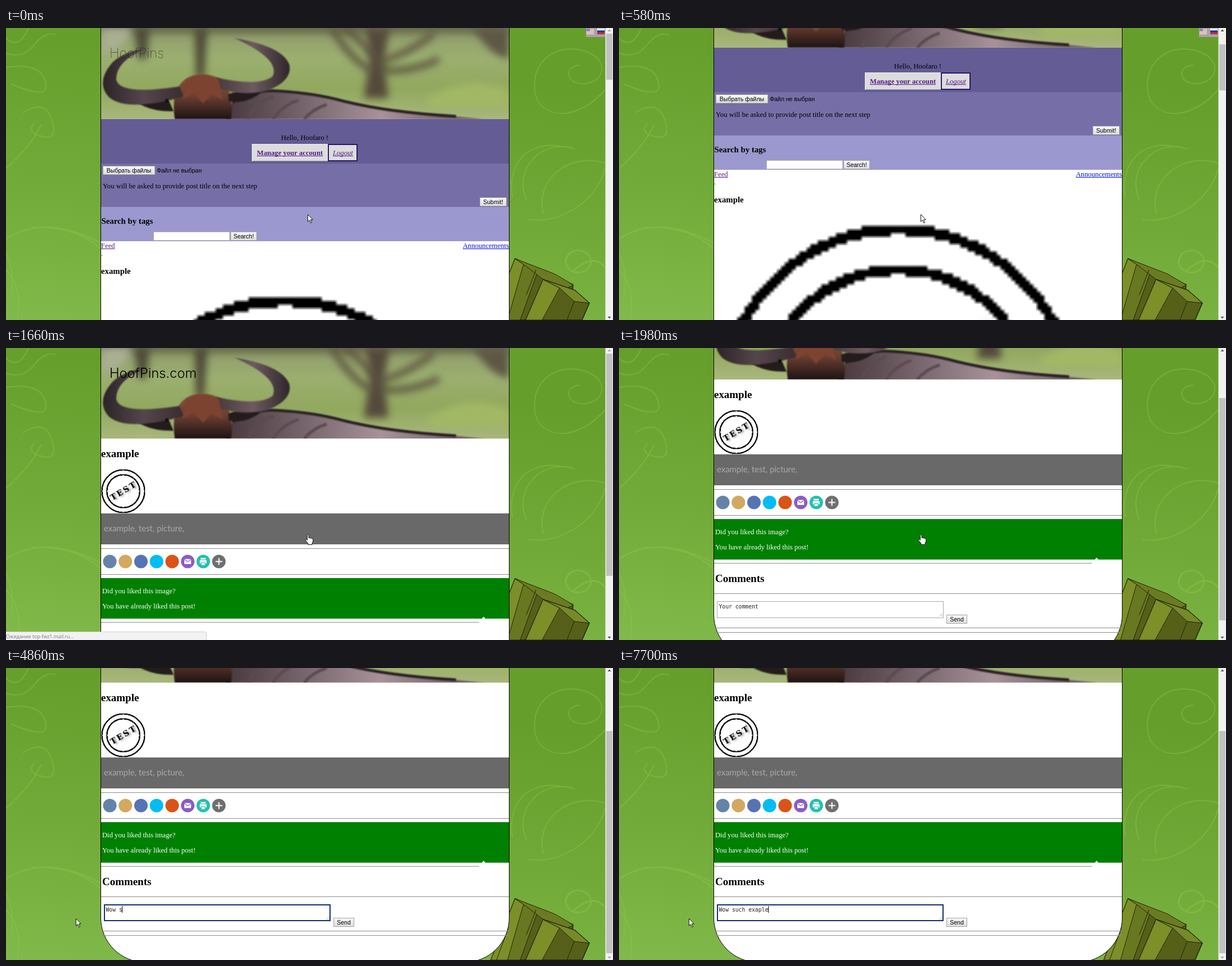
Write an HTML page with a canvas that moves like this. It is 1079x519 px and loops after 8 s.

```html
<!DOCTYPE html>
<html lang="en">
<head>
<meta charset="utf-8">
<title>Posting a comment</title>
<style>
html, body { margin: 0; width: 100%; height: 100%; overflow: hidden; }
canvas { display: block; }
</style>
</head>
<body>
<canvas id="stage" width="1079" height="519"></canvas>
<script>
const W = 1079, H = 519, LOOP = 8000;
const SERIF = '"Liberation Serif", "Times New Roman", serif';
const SANS = '"Liberation Sans", Arial, sans-serif';
const BODY = '12.64px ' + SERIF, H3 = 'bold 14.79px ' + SERIF, H2 = 'bold 18.96px ' + SERIF;
const UI = '10.53px ' + SANS, STATUS = '8.75px "Open Sans", sans-serif';
const CODE = '9.72px "DejaVu Sans Mono", monospace', CHAR = 5.85;
const VISITED = '#551a8b';

const stage = document.getElementById('stage').getContext('2d');
let g = stage;

// Drawing helpers, all painting into the current context g
function layer(w, h, draw) {
  const canvas = document.createElement('canvas');
  canvas.width = w;
  canvas.height = h;
  g = canvas.getContext('2d');
  draw();
  g = stage;
  return canvas;
}
function rect(x, y, w, h, fill) {
  g.fillStyle = fill;
  g.fillRect(x, y, w, h);
}
function frame(x, y, w, h, color, line = 1) {
  g.strokeStyle = color;
  g.lineWidth = line;
  g.strokeRect(x + line / 2, y + line / 2, w - line, h - line);
}
function shape(d, fill, stroke, line = 1) {
  const path = new Path2D(d);
  if (fill) { g.fillStyle = fill; g.fill(path); }
  if (stroke) { g.strokeStyle = stroke; g.lineWidth = line; g.stroke(path); }
}
function disc(x, y, r, fill) {
  g.beginPath();
  g.arc(x, y, r, 0, 7);
  g.fillStyle = fill;
  g.fill();
}
function gradient(x0, y0, x1, y1, ...colors) {
  const fill = g.createLinearGradient(x0, y0, x1, y1);
  colors.forEach((c, i) => fill.addColorStop(i / (colors.length - 1), c));
  return fill;
}
function text(s, x, y, font, color = '#000', align = 'left') {
  g.font = font;
  g.fillStyle = color;
  g.textAlign = align;
  g.fillText(s, x, y);
}
function link(s, x, y, font, color, align = 'left') {
  text(s, x, y, font, color, align);
  const w = g.measureText(s).width;
  rect(align === 'right' ? x - w : x, y + 1, w, 1, color);
}
function button(x, y, w, h, label) {
  rect(x, y, w, h, gradient(0, y, 0, y + h, '#f8f8f8', '#dcdcdc'));
  frame(x, y, w, h, '#a4a4a4');
  text(label, x + w / 2, y + 12, UI, '#000', 'center');
}
const rule = (y, right = 894) => rect(169, y, right - 169, 1, '#8c8c8c');

const backdrop = layer(W, H, () => {
  rect(0, 0, W, H, gradient(60, 0, 0, H, '#669e2c', '#72aa39', '#81b94a'));
  g.lineCap = 'round';
  const vine = 'rgba(150,200,70,.38)';
  shape('M0 45Q30 55 50 30T88 12M0 18Q22 40 40 0M0 70Q60 60 70 95T10 100' +
    'M30 150Q70 125 82 165T55 190Q38 182 50 170M0 250Q45 210 62 172', null, vine, 2);
  shape('M0 375Q70 330 168 382M45 355Q120 350 168 392M0 430Q30 460 20 519M0 400Q18 440 8 480', null, vine, 2);
  shape('M945 130C925 80 960 30 1015 38S1070 90 1035 98S985 70 1020 66M945 130C975 170 1030 150 1065 110',
    null, vine, 2);
  shape('M900 300C890 240 930 200 985 210M925 305C900 250 955 195 1010 215M930 340C980 350 1050 310 1065 250' +
    'M955 330C940 270 1000 220 1065 240', null, vine, 2);
  shape('M995 415a22 19 0 1 0 45 0a22 19 0 1 0-45 0M1010 430Q1045 400 1065 425', null, vine, 3);
  const ink = '#1e2408', dark = '#566019', light = '#7c8f29';
  shape('M905 410L1008 456L1003 519H862Z', dark, ink, 1.5);
  shape('M905 410L942 427L908 519H862Z', light, ink);
  shape('M921 418L947 428L914 519H892Z', '#687820', ink);
  shape('M905 410L975 437L1009 457L998 462L955 447L925 424Z', '#6c7b23', ink);
  shape('M955 447L1011 466L1037 489L1024 519H924Z', dark, ink, 1.5);
  shape('M955 447L984 462L953 519H924Z', light, ink);
  shape('M955 447L1011 466L1037 489L1010 486L984 462Z', '#78892a', ink);
  shape('M1010 486L997 519M942 430L925 474M872 519L893 462', null, ink);
});

const photo = layer(W, 162, () => {
  g.beginPath();
  g.rect(169, 0, 725, 162);
  g.clip();
  rect(169, 0, 725, 162, gradient(0, 0, 0, 162, '#8e9a6b', '#9caf70', '#91a85e', '#a9b77c'));
  g.filter = 'blur(7px)';
  rect(169, -10, 725, 20, '#66684a');
  shape('M228 0H255L250 55H235ZM335 0H358L352 90H338Z', '#4d4a37');
  shape('M640 0H682L672 60L680 125H636L646 60Z', '#554a3b');
  shape('M650 75Q610 55 580 0M660 60Q710 50 760 10M655 50Q620 10 600 0M664 75Q720 80 770 55', null, '#5c533e', 11);
  shape('M830 0H894V55Q860 50 830 0Z', '#5d5745');
  shape('M169 0H225Q205 50 169 45Z', '#a9af91');
  shape('M750 125Q820 80 894 110V140H750Z', '#a2b865');
  g.filter = 'blur(1px)';
  shape('M390 162L402 132Q440 108 485 112Q550 116 600 130Q680 150 800 157L850 162Z',
    gradient(400, 0, 800, 0, '#4a3c40', '#77666d', '#a8929a', '#71616a'));
  shape('M402 132Q440 108 485 112Q550 116 600 130Q680 150 800 157', null, '#2a2126', 5);
  shape('M430 162Q445 130 475 122M475 162Q490 138 520 128M530 162Q545 144 570 136', null, '#5b4a51', 5);
  shape('M300 162Q292 110 320 90Q348 74 380 90Q408 115 400 162Z',
    gradient(0, 80, 0, 162, '#8b5238', '#6b3f30', '#1d1315'));
  shape('M210 111Q250 112 290 130L298 148Q240 150 210 111ZM395 118Q425 104 452 116Q425 136 396 130Z', '#241b1d');
  shape('M251 36Q195 58 196 92Q202 120 308 104L316 122Q215 150 183 123Q160 98 186 65Q205 42 251 36Z',
    gradient(172, 0, 316, 0, '#2b2428', '#54464b', '#3a2d31'));
  shape('M406 18Q492 32 504 66Q509 94 465 111Q420 122 380 108L374 88Q450 105 474 86Q488 55 406 18Z',
    gradient(374, 0, 504, 0, '#4a393c', '#6c5a5f', '#30272b'));
  shape('M320 92Q345 75 378 92L386 128L366 118L350 134L334 116L314 126Z', '#7b4330');
  disc(286, 129, 3, '#0d0a0b');
  g.filter = 'none';
});

// Coarse 100 x 100 stamp, shown both enlarged and reduced
const stamp = layer(100, 100, () => {
  for (let y = 0; y < 100; y++) for (let x = 0; x < 100; x++) {
    const r = Math.hypot(x - 49.5, y - 49.5);
    if (Math.abs(r - 48) < 1.45 || Math.abs(r - 37) < 1.45) rect(x, y, 1, 1, '#000');
  }
  rect(0, 49, 1, 1, '#000');
  rect(10, 49, 1, 1, '#000');
  g.translate(49, 49.5);
  g.rotate(-0.535);
  g.shadowColor = 'rgba(0,0,0,.5)';
  g.shadowBlur = 4;
  g.shadowOffsetX = 4;
  g.shadowOffsetY = 1;
  [...'TEST'].forEach((s, i) =>
    text(s, (i - 1.5) * 16.6, 6.5, 'bold 18px "DejaVu Serif", serif', '#000', 'center'));
});

const feedPage = layer(W, 850, () => {
  rect(168, 0, 727, 850, '#000');
  rect(169, 0, 725, 850, '#fff');
  g.drawImage(photo, 0, 0);
  text('HoofPins', 184, 53, '100 23.7px Inter, sans-serif', '#1c1c18');
  rect(169, 162, 725, 79, '#635c95');
  rect(169, 241, 725, 77, '#766fa7');
  rect(169, 318, 725, 61, '#9b98cf');
  text('Hello, Hoofaro !', 531, 199, BODY, '#000', 'center');
  rect(437, 206, 135, 31, '#dcdcdc');
  frame(437, 206, 135, 31, '#efefef');
  rect(438, 236, 134, 1, '#8f8f9a');
  link('Manage your account', 446, 226, 'bold ' + BODY, VISITED);
  rect(572, 206, 53, 31, '#dcdcdc');
  frame(572, 206, 53, 31, '#2c1668', 2);
  link('Logout', 581, 226, 'italic ' + BODY, VISITED);
  button(172, 245, 93, 16, 'Выбрать файлы');
  text('Файл не выбран', 268, 257, UI);
  text('You will be asked to provide post title on the next step', 172, 285, BODY);
  button(842, 301, 48, 16, 'Submit!');
  text('Search by tags', 169.5, 348, H3);
  rect(262, 362, 136, 16, '#fff');
  frame(262, 362, 136, 16, '#b5b5b5');
  button(399, 362, 47, 16, 'Search!');
  link('Feed', 169, 391, BODY, VISITED);
  link('Announcements', 894, 391, BODY, '#0010d8', 'right');
  text('.', 169, 405, BODY, VISITED);
  text('example', 169, 437, H3);
  g.drawImage(stamp, 171, 472, 650, 650);
});

const postPage = layer(W, 660, () => {
  g.beginPath();
  g.roundRect(168.5, -200, 726, 858, 79);
  g.fillStyle = '#fff';
  g.fill();
  g.strokeStyle = '#000';
  g.stroke();
  g.drawImage(photo, 0, -1);
  text('HoofPins.com', 184, 53, '300 23.7px Inter, sans-serif');
  text('example', 169, 194, H2);
  g.drawImage(stamp, 169, 215, 79, 79);
  rect(169, 294, 725, 55, '#696969');
  text('example, test, picture,', 174, 326, '14.9px Lato, sans-serif', '#a9a9a9');
  rule(356);
  ['#6384a8', '#d2a95f', '#5673b5', '#00bdf3', '#da5418', '#8a5cc8', '#22c1ae', '#6f6f6f']
    .forEach((color, i) => disc(184.5 + i * 27.7, 379.5, 12, color));
  rect(317, 375, 12, 9, '#fff');
  shape('M317 375.5L323 380L329 375.5', null, '#8a5cc8', 1.3);
  shape('M346 373h9v3h-9zM344.500 377h12v6h-2v-2h-8v2h-2zM347.500 382h6v4h-6z', '#fff');
  shape('M378.500 373.500v12M372.500 379.500h12', null, '#fff', 2);
  rule(402);
  rect(169, 409, 725, 72, '#008000');
  text('Did you liked this image?', 171, 436, BODY, '#fff');
  text('You have already liked this post!', 171, 463, BODY, '#fff');
  shape('M846 481L849 477.500L852 481Z', '#fff');
  rule(487, 841);
  text('Comments', 171, 521, H2);
  rule(541);
  button(582, 579, 37, 16, 'Send');
  rule(602);
  rule(610);
});

// Piecewise linear value through [time, value] points
function track(t, points) {
  let [t0, v0] = points[0];
  for (const [t1, v1] of points) {
    if (t < t1) return t <= t0 ? v0 : v0 + (v1 - v0) * (t - t0) / (t1 - t0);
    [t0, v0] = [t1, v1];
  }
  return v0;
}

const feedScroll = [[340, 0], [440, 32], [580, 126], [680, 255], [740, 312], [800, 316]];
const postScroll = [[1785, 0], [1880, 40], [1980, 105], [2060, 130], [2120, 135]];
const pointerX = [[2040, 536], [2420, 249], [2600, 249], [2780, 218], [3300, 124]];
const pointerY = [[2040, 331], [2420, 436], [2600, 436], [2780, 443], [3300, 445]];
const typed = 'Wow such exaple';
const keyTimes = [3840, 4100, 4320, 4600, 4860, 5180, 5380, 5620, 5860, 6060, 6300, 6580, 7260, 7460, 7700];
const POST_AT = 1480, FOCUS_AT = 2610;

function commentBox(t, top) {
  const focused = t >= FOCUS_AT, left = 177.5, base = top + 13;
  rect(174, top, 403, 30, '#fff');
  frame(174, top, 403, 30, focused ? '#12316b' : '#a9a9a9', focused ? 2 : 1);
  shape(`M570 ${top + 27}l5-5M573 ${top + 27}l2-2`, null, '#999', .8);
  const count = keyTimes.filter(k => t >= k).length;
  if (count) {
    text(typed.slice(0, count), left, base, CODE, '#222');
    if (t < 7120 || t >= 7260) rect(Math.round(left + count * CHAR - .5), top + 3, 1, 12, '#000');
    return;
  }
  const draft = 'Your comment';
  text(draft, left, base, CODE, '#222');
  if (!focused) return;
  const from = Math.min(12, Math.max(0, Math.round((track(t, pointerX) + 5 - left) / CHAR)));
  if (from === 12) return;
  const x = left + from * CHAR;
  rect(x, top + 3, (12 - from) * CHAR, 12, '#338fe2');
  text(draft.slice(from), x, base, CODE, '#fff');
}

function flags() {
  rect(1031, 0, 34, 16, '#aaa3ab');
  for (let i = 0; i < 5; i++) rect(1032, 1 + i * 2, 13, 1, '#d98a86'), rect(1032, 2 + i * 2, 13, 1, '#eee');
  rect(1032, 1, 6, 5, '#8588b5');
  ['#fff', '#1c35a8', '#d3242c'].forEach((c, i) => rect(1051, 1 + i * 3.4, 13, 3.4, c));
}

function scrollbar(top, length, atStart, atEnd) {
  rect(1065.5, 0, 14, H, '#f1f1f1');
  rect(1067, Math.round(top), 11, length, '#c1c1c1');
  shape('M1069.500 6L1072.500 2.500L1075.500 6Z', atStart ? '#a3a3a3' : '#505050');
  shape('M1069.500 513L1072.500 516.500L1075.500 513Z', atEnd ? '#a3a3a3' : '#505050');
}

function statusBubble(label, width, alpha) {
  g.globalAlpha = alpha;
  g.beginPath();
  g.roundRect(-4, 504.5, width + 4, 20, 3);
  g.fillStyle = '#f2f2f2';
  g.fill();
  g.strokeStyle = '#cfcfcf';
  g.lineWidth = 1;
  g.stroke();
  text(label, 0, 516, STATUS, '#777');
  g.globalAlpha = 1;
}

function pointer(t) {
  const x = track(t, pointerX), y = track(t, pointerY);
  g.save();
  g.translate(Math.round(x) + .5, Math.round(y) + .5);
  if (t >= 1220 && t < 2040)
    shape('M-1 1.200Q.3-.8 1.600 1.200V6Q3 5 4.200 6.400Q5.800 5.600 6.800 7Q9 6.400 9.300 8.500V12L7.600 15.500V18H.5V16L-4.600 9.600Q-4.400 7.600-2.400 8.600L-1 10Z', '#fff', '#000', .9);
  else if (y > 420 && x > 170)
    shape('M-2.500-6.500H-.7L0-6L.7-6.500H2.500M0-6V6M-2.500 6.500H-.7L0 6L.7 6.500H2.500', null, '#000', 1);
  else
    shape('M0 0V12.600L2.900 9.900L5.200 15L7.100 14.200L4.900 9.200H8.900Z', '#fff', '#000', .9);
  g.restore();
}

function draw(t) {
  g.drawImage(backdrop, 0, 0);
  if (t < POST_AT) {
    const y = Math.round(track(t, feedScroll));
    g.drawImage(feedPage, 0, -y);
    flags();
    scrollbar(10 + y * .151, 82, y === 0, false);
    if (t >= 940 && t < 1420) statusBubble('hoofpins.com/post/example', 374, Math.min(1, (t - 910) / 90));
  } else {
    const y = Math.round(track(t, postScroll));
    g.drawImage(postPage, 0, -y);
    commentBox(t, 555 - y);
    scrollbar(10 + y * .756, 395, y === 0, y === 135);
  }
  if (t >= 1420 && t < 1900) statusBubble('Ожидание top-fwz1.mail.ru...', 356.5, 1);
  pointer(t);
}

const start = performance.now();
function tick() {
  draw((performance.now() - start) % LOOP);
  requestAnimationFrame(tick);
}
tick();
</script>
</body>
</html>
```
